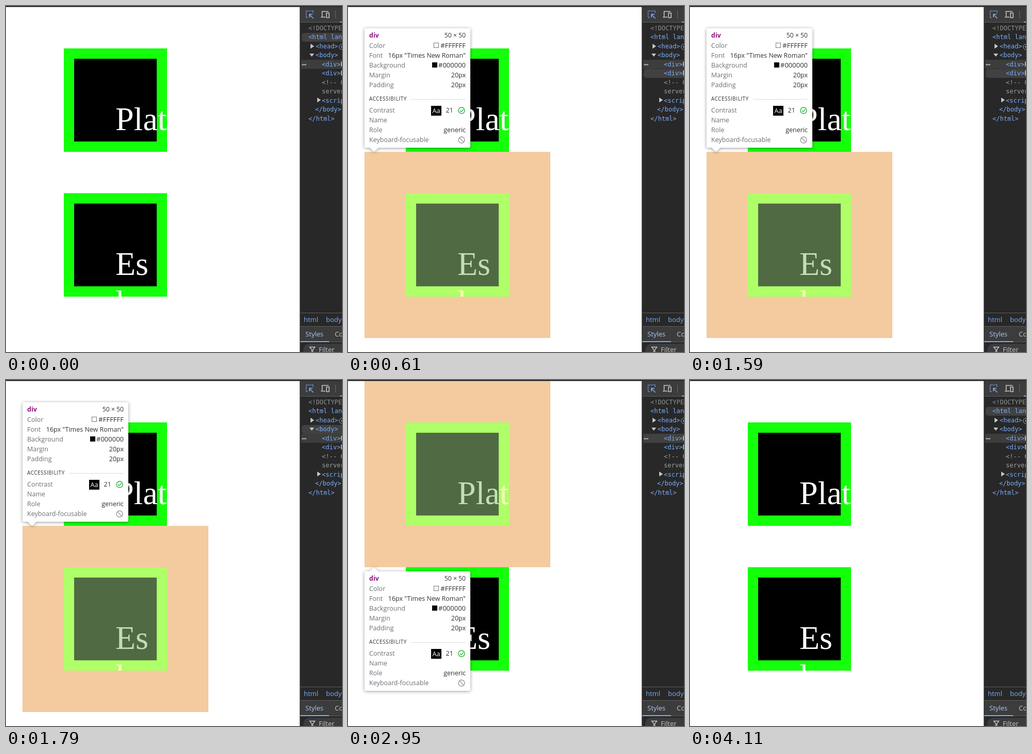
Animation of 651 by 669 pixels, one loop 5070 ms. Source, as an HTML page:

```html
<!DOCTYPE html>
<html lang="en">
<head>
<meta charset="utf-8">
<style>
html, body { margin: 0; width: 100%; height: 100%; overflow: hidden; background: #fff; }
svg { display: block; }
text { white-space: pre; }
.page { font: 64px "Liberation Serif", serif; fill: #fff; }
.ui { font: 12.5px "Open Sans", "Noto Sans", sans-serif; }
.code { font: 12px "DejaVu Sans Mono", monospace; }
.tip { filter: drop-shadow(0 1px 3px #0006); }
</style>
</head>
<body>
<svg id="stage" width="651" height="669" viewBox="0 0 651 669"></svg>
<script>
const rect = (x, y, w, h, fill, extra = '') =>
  `<rect x="${x}" y="${y}" width="${w}" height="${h}" fill="${fill}" ${extra}/>`;
const text = (x, y, str, fill, extra = '') =>
  `<text x="${x}" y="${y}" fill="${fill}" ${extra}>${str.replace(/</g, '&lt;')}</text>`;
const path = (d, stroke, extra = 'fill="none"') => `<path d="${d}" stroke="${stroke}" ${extra}/>`;
const frame = (x, y, w, h, inX, inY, inW, inH, fill) =>
  path(`M${x} ${y}h${w}v${h}h${-w}zM${inX} ${inY}h${inW}v${inH}h${-inW}z`, 'none', `fill="${fill}" fill-rule="evenodd"`);

const BLUE = '#7cacf8', GREY = '#c7c7c7', MARGIN = 'rgba(237,176,110,.66)';

function box(y, lines) {
  const words = lines.map((s, i) => `<text x="212" y="${y + 158 + i * 73.5}">${s}</text>`).join('');
  return rect(112, y, 200, 200, '#14ff0a') + rect(132, y + 20, 160, 160, '#000') +
    `<svg x="0" y="${y}" width="312" height="200" viewBox="0 ${y} 312 200" class="page">${words}</svg>`;
}

function tooltip(x, y, arrowUp, name, size, color) {
  const tipY = arrowUp ? y - 8 : y + 239, baseY = arrowUp ? y : y + 231;
  const end = 'text-anchor="end"';
  const label = (dy, s) => text(x + 9, y + dy, s, '#6b6f74');
  const value = (dy, s, extra = '') => text(x + 196, y + dy, s, '#303134', end + extra);
  const row = (dy, s, v) => label(dy, s) + value(dy, v);
  const hex = ' font-size="13"';
  let out = `<g class="tip">${rect(x, y, 205, 231, '#fff', 'rx="3"')}` +
    path(`M${x + 10} ${baseY}L${x + 18.5} ${tipY}L${x + 27} ${baseY}z`, 'none', 'fill="#fff"') + '</g>' +
    text(x + 9, y + 18, name, '#881280', 'font-weight="700"') + value(18, size, ' font-size="12.2"') +
    label(38, 'Color') + value(38, color, hex) +
    rect(x + (color === '#FFFFFF' ? 134.5 : 131.5), y + 28.5, 9, 9, color, 'stroke="#777"') +
    row(57, 'Font', '16px "Times New Roman"');
  if (name === 'body') return out + row(76, 'Margin', '8px');
  return out + label(76, 'Background') + value(76, '#000000', hex) + rect(x + 131, y + 66, 10, 10, '#000') +
    row(95, 'Margin', '20px') + row(114, 'Padding', '20px') +
    text(x + 9, y + 140, 'ACCESSIBILITY', '#303134', 'font-size="10" letter-spacing=".5"') +
    rect(x + 90, y + 137, 106, 1, '#ddd') +
    label(163, 'Contrast') + rect(x + 129, y + 150, 20, 19, '#000') +
    text(x + 131.5, y + 164, 'Aa', '#fff') + text(x + 157.5, y + 163, '21', '#303134') +
    `<circle cx="${x + 188}" cy="${y + 159}" r="6" fill="none" stroke="#26b53c" stroke-width="1.4"/>` +
    path(`M${x + 185} ${y + 159}l2.3 2.4l4.4 -4.6`, '#26b53c', 'fill="none" stroke-width="1.4"') +
    label(182, 'Name') + row(201, 'Role', 'generic') + label(220, 'Keyboard-focusable') +
    `<circle cx="${x + 188}" cy="${y + 216}" r="6" fill="none" stroke="#999" stroke-width="1.4"/>` +
    path(`M${x + 184} ${y + 212}l8 8`, '#999', 'stroke-width="1.4"');
}

const divOverlay = y => frame(32, y - 80, 360, 360, 112, y, 200, 200, MARGIN) +
  frame(112, y, 200, 200, 132, y + 20, 160, 160, 'rgba(255,255,153,.66)') +
  rect(132, y + 20, 160, 160, 'rgba(147,196,125,.55)');

const overlays = {
  body: frame(0, 50, 569, 544, 32, 82, 505, 480, MARGIN) + rect(32, 82, 505, 480, 'rgba(111,170,218,.66)') +
    tooltip(2, 602, true, 'body', '126.25 × 120', '#000000'),
  div1: divOverlay(82) + tooltip(32, 370, true, 'div', '50 × 50', '#FFFFFF'),
  div2: divOverlay(362) + tooltip(32, 43, false, 'div', '50 × 50', '#FFFFFF'),
};
const rowTop = { html: 52, body: 87, div1: 104, div2: 122 };

function panel() {
  const tree = [
    [586, '<!DOCTYPE', '#8e918f'], [586, '<html lan', BLUE], [600, '<head>', BLUE], [600, '<body>', BLUE],
    [612, '<div>', BLUE, 'P'], [612, '<div>', BLUE, 'E'], [612, '<!-- C', '#9aa09a'], [612, 'server', '#9aa09a'],
    [612, '<scrip', BLUE], [599, '</body>', BLUE], [586, '</html>', BLUE],
  ].map(([x, s, fill, after], i) => {
    const y = 46.5 + i * 17.5;
    return text(x, y, s, fill) + (after ? text(x + 36, y, after, '#e3e3e3') : '');
  }).join('');
  const arrow = d => path(d, 'none', `fill="${GREY}"`);
  const dots = [575, 578, 581].map(x => `<circle cx="${x - .5}" cy="113.5" r="1.2" fill="${GREY}"/>`).join('');
  return rect(569, 0, 82, 669, '#282828') + rect(570, 2, 81, 29, '#3c3c3c') + rect(570, 31, 81, 1, '#5e5e5e') +
    rect(647, 30, 4, 2, BLUE) + rect(569.5, 2, 1, 667, '#4a4a4a') +
    path('M595 13v-3.5h-13.5v13h4', BLUE, 'fill="none" stroke-width="1.5" stroke-dasharray="2 1.4"') +
    path('M595.5 24l-7 -7M588 22v-6h6', BLUE, 'fill="none" stroke-width="1.7"') +
    path('M625 10.5h-12.5v10M610 21.5h9M621 13.5h5v9h-5z', GREY, 'fill="none" stroke-width="1.6"') +
    rect(638, 9, 1, 15, '#6a6a6a') +
    rect(572, 104, 79, 17.5, '#3d3d3d') +
    rect(573, 0, 84, 17, '#414141', 'rx="5" id="hover"') + dots +
    `<g class="code">${tree}</g>` +
    arrow('M590 73l7 4.7l-7 4.7z') + arrow('M588 92h9l-4.5 6z') + arrow('M603 177l7 4.7l-7 4.7z') +
    `<circle cx="650.5" cy="79" r="5" fill="none" stroke="${BLUE}"/><circle cx="650.5" cy="79" r="1.5" fill="${BLUE}"/>` +
    rect(570, 593, 81, 1, '#5e5e5e') + rect(570, 619, 81, 1, '#5e5e5e') +
    `<g font-size="13">${text(577, 611, 'html', BLUE)}${text(620, 611, 'body', BLUE)}` +
    rect(570, 620, 81, 30, '#3c3c3c') + rect(570, 649, 81, 1, '#5e5e5e') + rect(570, 648, 56, 2, BLUE) +
    text(580, 639, 'Styles', '#a8c7fa') + text(637, 639, 'Co', GREY) +
    rect(576, 653, 100, 24, '#3c3c3c', 'rx="12"') + text(606, 669, 'Filter', GREY) + '</g>' +
    path('M588.5 659.5h10l-4 5v5h-2v-5z', GREY, 'fill="none" stroke-width="1.4"');
}

const stage = document.getElementById('stage');
stage.innerHTML = rect(0, 0, 651, 669, '#fff') + box(82, ['Plat']) + box(362, ['Es', 'l']) +
  `<g class="ui">${Object.entries(overlays).map(([id, s]) => `<g id="${id}">${s}</g>`).join('')}${panel()}</g>` +
  rect(0, 0, 651, 2, '#2b2b2b');

// [start ms, hovered row, highlighted box]; the page highlight can lag behind the row
const steps = [
  [0, 'html', ''], [260, 'body'], [380, 'div1'], [510, 'div2'],
  [1150, 'div1'], [1210, 'body'], [1420, 'div1'], [1520, 'div2'],
  [1720, 'div1', 'div2'], [1760, 'body', 'div2'], [1820, 'body', 'div1'], [1880, 'body'], [2060, 'div1'], [2150, 'div2'],
  [2270, 'div1'], [2340, 'body', 'div1'], [2400, 'body'], [2560, 'div1'], [2650, 'div2'],
  [2880, 'div1'], [2960, 'body'], [3110, 'html', ''],
];
const nodes = Object.keys(overlays).map(id => document.getElementById(id));
const hover = document.getElementById('hover');

function draw() {
  const t = performance.now() % 5070;
  const [, row, shown = row] = steps.findLast(s => s[0] <= t);
  for (const n of nodes) n.style.display = n.id === shown ? '' : 'none';
  hover.setAttribute('y', rowTop[row]);
  requestAnimationFrame(draw);
}
draw();
</script>
</body>
</html>
```
